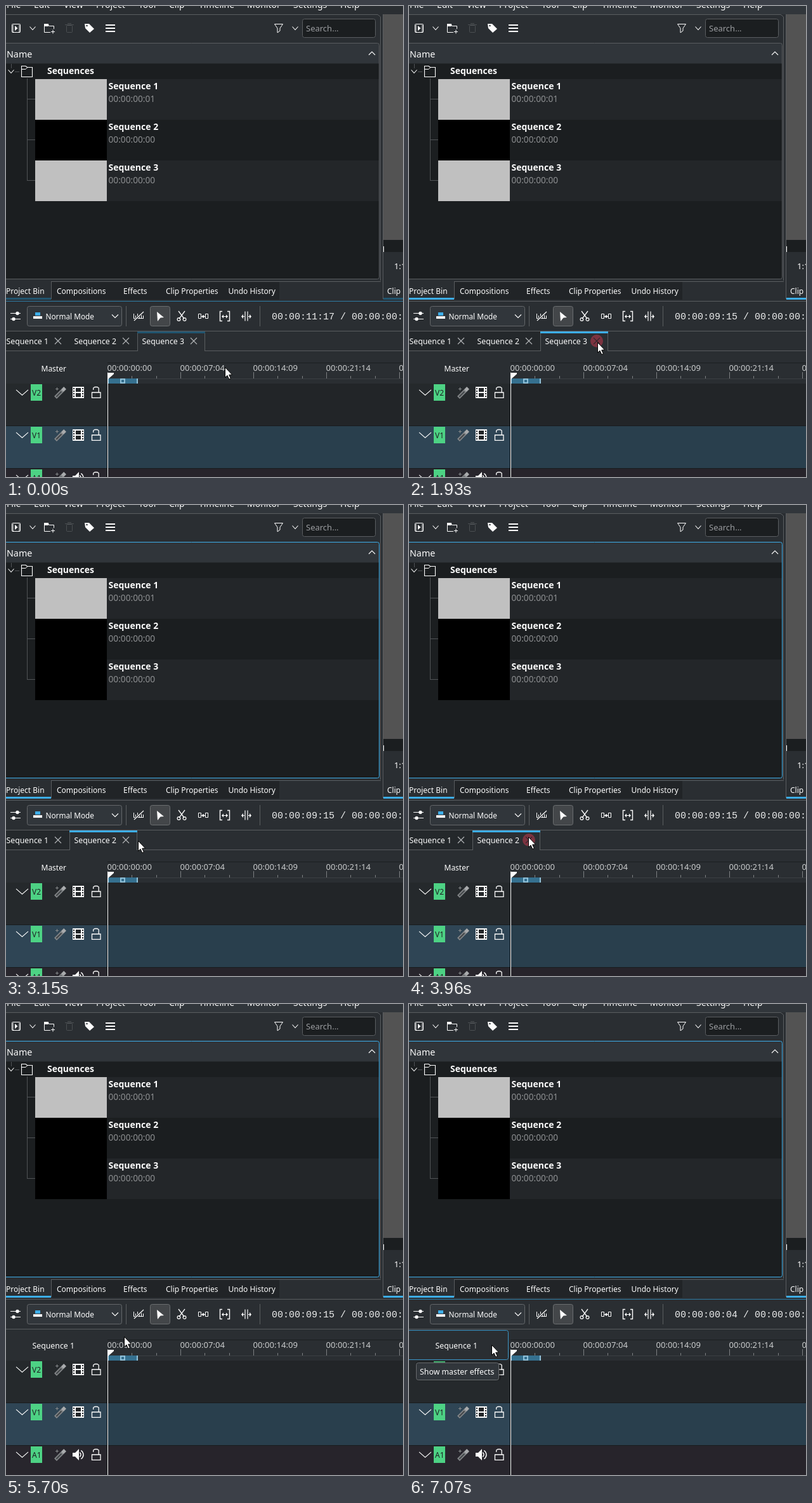
An HTML page with a canvas that plays this animation: 626x741 px, repeating every 8 s.

```html
<!DOCTYPE html>
<html lang="en">
<head>
<meta charset="utf-8">
<title>Sequence tabs</title>
<style>
html, body { margin: 0; width: 626px; height: 741px; overflow: hidden; background: #2a2e32; }
canvas { display: block; }
</style>
</head>
<body>
<canvas id="stage" width="626" height="741"></canvas>
<script>
const ctx = document.getElementById('stage').getContext('2d');
const LOOP = 8000;
const SANS = '"Noto Sans", "Open Sans", sans-serif';
const MONO = '"Liberation Mono", "DejaVu Sans Mono", monospace';
const WIN = '#2a2e32', VIEW = '#1b1e20', ALT = '#232629', EDGE = '#5a5d60';
const INK = '#fcfcfc', BLUE = '#3daee9', DIM_BLUE = '#22556f';

// Pointer moves: start, end, number of steps, target position
const START = [345.6, 568];
const MOVES = [
  [70, 920, 13, 298, 529],
  [2530, 3290, 11, 200, 528],
  [3360, 3570, 4, 174, 507],
  [3820, 3960, 3, 189, 522],
  [5700, 6190, 8, 131, 536]
];

function rect(x, y, w, h, color) {
  ctx.fillStyle = color;
  ctx.fillRect(x, y, w, h);
}

function box(x, y, w, h, r, fill, edge) {
  ctx.beginPath();
  ctx.roundRect(x + .5, y + .5, w - 1, h - 1, r);
  if (fill) { ctx.fillStyle = fill; ctx.fill(); }
  if (edge) { ctx.strokeStyle = edge; ctx.lineWidth = 1; ctx.stroke(); }
}

function text(str, x, y, size = 12, color = INK, weight = 400, font = SANS) {
  ctx.font = `${weight} ${size}px ${font}`;
  ctx.fillStyle = color;
  ctx.fillText(str, x, y);
}

function trace(pts) {
  ctx.beginPath();
  for (let i = 0; i < pts.length; i += 2) ctx.lineTo(pts[i], pts[i + 1]);
}

function line(pts, color = INK, width = 1, closed = false) {
  trace(pts);
  if (closed) ctx.closePath();
  ctx.strokeStyle = color;
  ctx.lineWidth = width;
  ctx.stroke();
}

function poly(pts, color = INK) {
  trace(pts);
  ctx.fillStyle = color;
  ctx.fill();
}

function disc(x, y, r, color) {
  ctx.beginPath();
  ctx.arc(x, y, r, 0, 7);
  ctx.fillStyle = color;
  ctx.fill();
}

function ring(x, y, r, color = INK, width = 1) {
  ctx.beginPath();
  ctx.arc(x, y, r, 0, 7);
  ctx.strokeStyle = color;
  ctx.lineWidth = width;
  ctx.stroke();
}

function at(x, y, draw) {
  ctx.save();
  ctx.translate(x, y);
  draw();
  ctx.restore();
}

const chevron = (x, y, w, h, color = INK) => line([x - w, y - h, x, y + h, x + w, y - h], color, 1.1);

function pointer(t) {
  let [x, y] = START;
  for (const [t0, t1, n, tx, ty] of MOVES) {
    if (t < t0) break;
    const step = Math.min(n, Math.floor((t - t0) / (t1 - t0) * (n - 1) + 1e-6) + 1);
    const u = step / n, e = u * u * (3 - 2 * u);
    x += (tx - x) * e;
    y += (ty - y) * e;
  }
  return [Math.round(x), Math.round(y)];
}

// 30 frames per second, 115 px every 644/3 frames
function timecode(frames) {
  const two = n => String(n).padStart(2, '0');
  return `00:00:${two(Math.floor(frames / 30))}:${two(frames % 30)}`;
}
const FRAMES_PER_PX = 644 / 345;

function menuBar(active) {
  rect(0, 0, 626, 13, active ? '#31363b' : WIN);
  const items = [['File', 1], ['Edit', 44], ['View', 91], ['Project', 142], ['Tool', 209], ['Clip', 257],
    ['Timeline', 304], ['Monitor', 380], ['Settings', 453], ['Help', 527]];
  for (const [name, x] of items) text(name, x, 3, 14);
}

function binToolbar() {
  line([0, 13.5, 586, 13.5, 590.5, 17, 590.5, 432], EDGE);
  box(9, 28, 14, 14, 1, null, INK);
  for (let y = 30; y < 41; y += 2) { rect(10, y, 2, 1, INK); rect(20, y, 2, 1, INK); }
  poly([14, 31, 18.5, 35, 14, 39]);
  chevron(42, 35, 4.5, 2.5);
  line([70, 41.5, 60.5, 41.5, 60.5, 28.5, 66, 28.5, 68, 31.5, 75.5, 31.5, 75.5, 36], INK);
  rect(60, 28, 7, 4, INK);
  rect(71, 40, 6, 1, INK);
  rect(73.5, 37.5, 1, 6, INK);
  box(95, 30, 10, 12, 1, null, '#4b4f52');
  rect(93, 29, 14, 1, '#4b4f52');
  rect(97, 27, 6, 1, '#4b4f52');
  poly([124, 28, 131, 28, 139, 36, 132, 42, 125, 35]);
  disc(127.5, 31, 1.2, WIN);
  for (const y of [29, 34, 39]) rect(157, y, 15, 2, INK);
  line([423.5, 28.5, 436.5, 28.5, 432, 35, 432, 39, 428, 42, 428, 35], INK, 1, true);
  chevron(456, 35, 4.5, 2.5);
  box(467, 20, 116, 30, 3, VIEW, EDGE);
  text('Search...', 473, 40, 13, '#9b9da0');
}

function bin(focused, thirdDark) {
  box(-5, 58, 594, 372, 3, VIEW, null);
  rect(0, 59, 588, 31, '#30353a');
  rect(0, 90, 588, 1, '#25292c');
  text('Name', 1, 81, 14.3);
  line([572, 77, 577, 72, 582, 77], INK, 1.1);

  const wire = '#505356';
  rect(8, 91, 1, 7, wire);
  chevron(8, 103, 4.5, 2.5);
  rect(14, 103, 7, 1, wire);
  line([24.5, 111.5, 24.5, 94.5, 31, 94.5, 33.5, 96.5, 41.5, 96.5, 41.5, 111.5], INK, 1.1, true);
  line([25, 99.5, 31, 99.5, 33.5, 97], INK);
  text('Sequences', 65, 107, 14, INK, 700);

  ['#c0c0c0', '#000', thirdDark ? '#000' : '#c0c0c0'].forEach((thumb, i) => {
    const y = 115 + 64 * i;
    rect(46, y, 542, 64, i % 2 ? VIEW : ALT);
    rect(33, i ? y - 33 : 114, 1, i ? 65 : 33, wire);
    rect(33, y + 31, 13, 1, wire);
    rect(46, y, 113, 64, thumb);
    text('Sequence ' + (i + 1), 161.5, y + 16, 14, INK, 700);
    text(timecode(i ? 0 : 1), 161.5, y + 36, 13.7, '#8c8e90');
  });
  box(-5, 58, 594, 372, 3, null, focused ? BLUE : EDGE);
}

function monitorEdge() {
  rect(594, 13, 1, 420, EDGE);
  rect(595, 13, 31, 355, '#535353');
  rect(595, 368, 31, 19, VIEW);
  rect(595, 378, 1, 9, INK);
  text('1:1', 612, 414, 13);
}

function dockTabs(active) {
  const mark = active ? BLUE : DIM_BLUE;
  rect(71, 433, 360, 29, '#212427');
  rect(71, 433, 520, 1, EDGE);
  rect(71, 433, 1, 28, EDGE);
  rect(0, 459, 71, 3, mark);
  rect(594, 433, 1, 28, EDGE);
  rect(595, 459, 31, 3, mark);
  const tabs = [['Project Bin', 0], ['Compositions', 80], ['Effects', 185], ['Clip Properties', 252],
    ['Undo History', 350.5], ['Clip Monitor', 601]];
  for (const [name, x] of tabs) text(name, x, 453);
}

function toolbar(frames, hover) {
  rect(0, 464, 626, 1, hover ? '#2f7ba3' : EDGE);
  rect(0, 511, 626, 1, EDGE);
  rect(7, 483, 16, 1, INK);
  rect(7, 492, 16, 1, INK);
  disc(18, 483.5, 2.7, INK);
  disc(12, 492.5, 2.7, INK);

  box(33, 472, 150, 32, 3, '#31363b', '#64676a');
  rect(46, 482, 8, 5, BLUE);
  rect(43, 488, 14, 4, INK);
  text('Normal Mode', 62.5, 493, 11.8);
  chevron(172, 488, 5, 2.5);
  rect(189, 472, 1, 32, EDGE);

  at(209, 488, () => {
    for (let i = 0; i < 6; i++) rect(3 * i - 8, i % 2 ? -1 : -4, 1, i % 2 ? 4 : 7, INK);
    rect(-8, 3, 16, 1, INK);
    line([-7, 7, 8, -7], WIN, 3);
    line([-7, 7, 8, -7], INK, 1.2);
  });
  box(227, 472, 32, 32, 3, '#434649', '#6b6e70');
  poly([238, 481, 249, 490, 243.5, 490.5, 239, 496]);
  at(277, 488, () => {
    line([-5, -8, 4, 4], INK, 1.3);
    line([5, -8, -4, 4], INK, 1.3);
    ring(-4.5, 5, 2.4, INK, 1.2);
    ring(4.5, 5, 2.4, INK, 1.2);
  });
  at(311, 488, () => {
    box(-8, -4, 5, 8, 0, null, INK);
    box(3, -4, 5, 8, 0, null, INK);
    rect(-3, 0, 6, 1, INK);
    poly([-2.5, .5, 0, -2, 0, 3]);
    poly([2.5, .5, 0, -2, 0, 3]);
  });
  at(345, 488, () => {
    for (const s of [-1, 1]) line([4 * s, -7.5, 7.5 * s, -7.5, 7.5 * s, 7.5, 4 * s, 7.5], INK, 1.4);
    rect(-4, 0, 8, 1, INK);
    poly([-5, .5, -2, -2.5, -2, 3.5]);
    poly([5, .5, 2, -2.5, 2, 3.5]);
  });
  at(379, 488, () => {
    for (const s of [-1, 1]) {
      line([2 * s, -7.5, 2 * s, 7.5], INK, 1.2);
      line([3 * s, .5, 7 * s, .5], INK);
      poly([8 * s, .5, 5 * s, -3, 5 * s, 4]);
    }
  });
  rect(400, 472, 1, 32, EDGE);
  text(`${timecode(frames)} / ${timecode(0)}`, 419, 493, 15, '#eceded', 400, MONO);
}

function sequenceTabs(count, active, mx, my) {
  const left = [0, 100, 207, 314];
  rect(0, 542, 626, 1, EDGE);
  for (let i = 0; i < count; i++) {
    const x = left[i], w = left[i + 1] - x, cx = left[i + 1] - 18;
    const current = i === count - 1;
    rect(x, 512, w, current ? 31 : 30, current ? WIN : '#24282b');
    if (current) {
      rect(x, 512, 1, 31, EDGE);
      rect(x + w - 1, 512, 1, 31, EDGE);
      rect(x, 512, w, 3, active ? BLUE : DIM_BLUE);
    }
    text('Sequence ' + (i + 1), i ? x + 7.5 : .5, 532, 12.3);
    const hot = Math.hypot(mx - cx, my - 527) < 9;
    if (hot) disc(cx, 527, 10, '#7c3340');
    const color = hot ? '#33282e' : '#b4b6b8';
    line([cx - 5, 522, cx + 5, 532], color, 1.1);
    line([cx + 5, 522, cx - 5, 532], color, 1.1);
  }
}

function wand() {
  line([-8, 8, 7, -7], '#85888a', 5.5);
  line([-6.8, 6.8, 1.5, -1.5], '#45494c', 2.4);
  line([3, -3, 7, -7], '#a9abad', 5);
  rect(-8, -6, 5, 1, '#85888a');
  rect(-6, -8, 1, 5, '#85888a');
}

function film() {
  rect(-9, -9, 18, 18, INK);
  rect(-4, -7, 8, 6, ALT);
  rect(-4, 1, 8, 6, ALT);
  for (let y = -7; y < 8; y += 4) { rect(-8, y, 2, 2, ALT); rect(6, y, 2, 2, ALT); }
}

function speaker() {
  poly([-9, -3, -5, -3, 1, -9, 1, 9, -5, 3, -9, 3]);
  for (const r of [4, 8]) {
    ctx.beginPath();
    ctx.arc(0, 0, r, -1, 1);
    ctx.strokeStyle = INK;
    ctx.lineWidth = 1.5;
    ctx.stroke();
  }
}

function lock() {
  line([-6.5, 0, 7, 0, 7, 8.3, -6.5, 8.3], INK, 1.3, true);
  line([-4.3, -4, -4.3, -7, -2, -8.5, 2, -8.5, 4.2, -7, 4.2, 0], INK, 1.3);
}

function track(name, y, head, area) {
  rect(0, y - 1, 160, 66, head);
  rect(160, y - 1, 466, 66, area);
  rect(0, y + 65, 626, 1, '#191c1e');
  chevron(25.5, y + 13, 9.5, 4.2);
  rect(39, y, 18, 26, '#4dd284');
  text(name, 41, y + 18, 12, '#1d2023');
  at(86, y + 13, wand);
  at(114, y + 13, name[0] === 'V' ? film : speaker);
  at(142, y + 13, lock);
}

function timeline(label, labelX) {
  text(label, labelX, 575, labelX < 50 ? 12.3 : 12);
  rect(160, 561, 466, 1, '#1b1e20');
  for (let i = 0; i < 13; i++) {
    const x = 160 + Math.round(i * 115 / 3), major = i % 3 === 0;
    rect(x, major ? 576 : 582, 1, major ? 10 : 4, '#7d8082');
    if (major) text(timecode(Math.floor(i / 3 * 644 / 3)), x - .5, 574, 13.1, '#c9cbcc');
  }
  rect(160, 586, 466, 1, '#3b3f43');
  rect(160, 586, 48, 8, '#35708f');
  rect(160, 586, 2, 8, '#8fc0d8');
  rect(206, 586, 2, 8, '#8fc0d8');
  rect(180, 586, 8, 8, '#8fc0d8');
  rect(182, 588, 4, 4, '#35708f');
  track('V2', 595, '#25292c', '#222528');
  track('V1', 662, '#2f4555', '#293f4d');
  track('A1', 729, '#28262d', '#27242b');
  rect(159, 595, 1, 200, '#1b1e20');
  poly([160, 577, 170, 577, 170, 579, 161, 587, 160, 587]);
  rect(160, 577, 1, 200, INK);
}

function tooltip(alpha) {
  ctx.save();
  ctx.globalAlpha = alpha;
  box(10, 562, 135, 31, 4, 'rgba(0,0,0,.25)');
  box(11, 564, 131, 28, 3, '#31363b', '#6a6d70');
  text('Show master effects', 17, 583, 12.35);
  ctx.restore();
}

function cursor(x, y) {
  at(x, y, () => {
    const shape = [.5, .5, .5, 16.5, 4, 13.2, 6.8, 19.3, 9.4, 18.2, 6.7, 12.3, 11.5, 12];
    poly(shape, '#fff');
    line(shape, '#000', 1, true);
  });
}

function draw(t) {
  const [x, y] = pointer(t);
  const active = t >= 1930, focused = t >= 2200, single = t >= 4310;
  const inHeader = single && x < 157;
  const overRuler = t >= 5700 && y >= 528;
  const seek = Math.round((x - 160) * FRAMES_PER_PX);
  const frames = overRuler ? Math.max(4, seek) : Math.max(285, active ? 0 : seek);
  rect(0, 0, 626, 741, WIN);
  menuBar(active);
  binToolbar();
  bin(focused, focused);
  monitorEdge();
  dockTabs(active);
  at(0, single ? -33 : 0, () => timeline(single ? 'Sequence 1' : 'Master', single ? 41.5 : 55.5));
  toolbar(frames, single ? overRuler : y >= 543);
  if (!single) sequenceTabs(t < 2000 ? 3 : 2, active, x, y);
  if (inHeader) box(-4, 513, 161, 47, 3, null, '#3b94c4');
  if (t >= 6930) tooltip(Math.min(1, (Math.floor((t - 6930) / 70) + 1) / 3));
  cursor(x - 1, y);
}

function tick() {
  draw(performance.now() % LOOP);
  requestAnimationFrame(tick);
}
tick();
</script>
</body>
</html>
```
